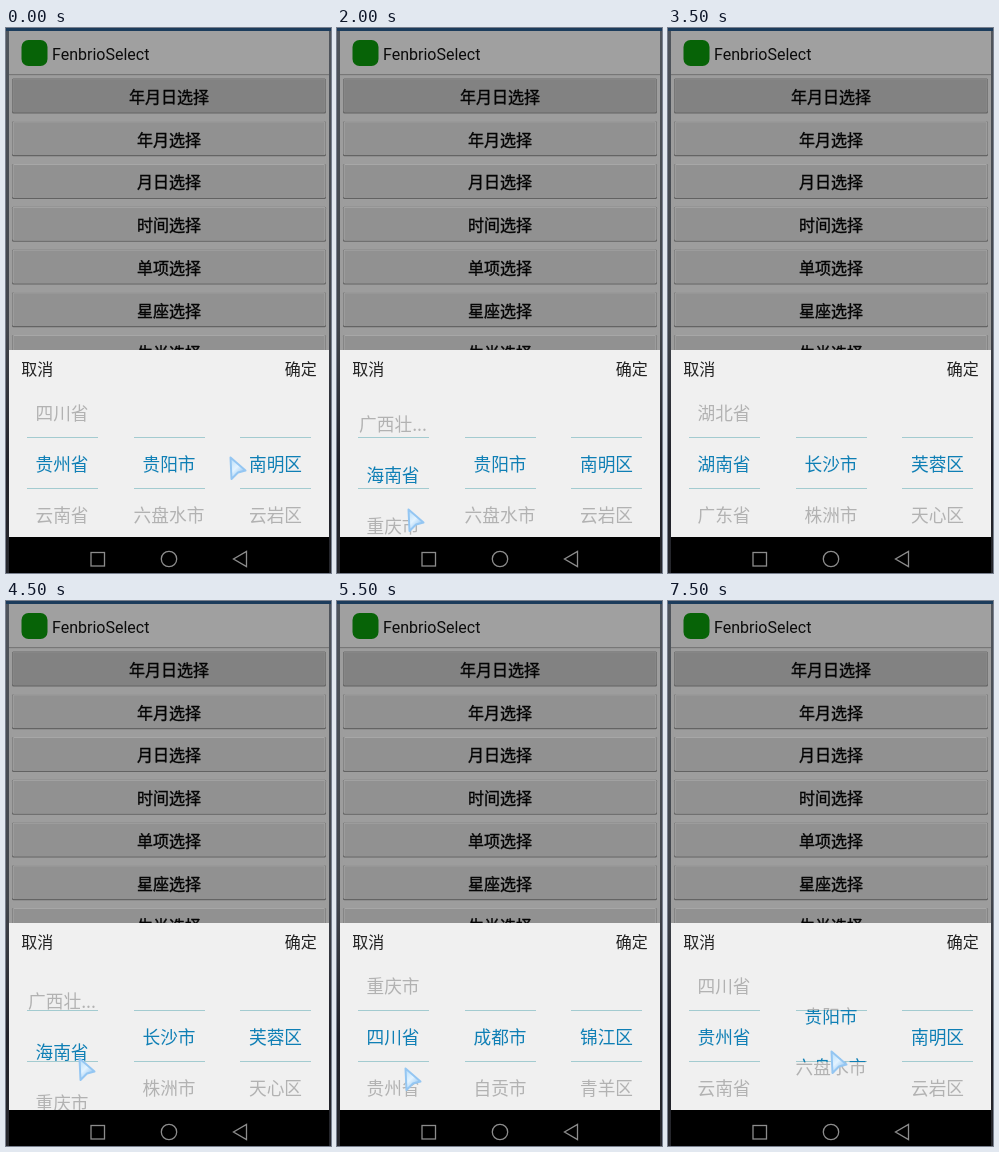
Write an HTML page that moves like this. It is 325x545 px and loops after 8000 ms.

```html
<!DOCTYPE html>
<html lang="zh-CN">
<head>
<meta charset="utf-8">
<title>Region wheel</title>
<style>
html, body { margin: 0; width: 100%; height: 100%; overflow: hidden; background: #25272e; }
svg { display: block; width: 325px; height: 545px; }
text { font-family: "Noto Sans CJK SC", "Noto Sans CJK", sans-serif; font-size: 16px; }
.title { font-family: Roboto, sans-serif; fill: #0c0c0c; }
.button text { text-anchor: middle; fill: #050505; stroke: #050505; stroke-width: .35px; }
.wheel text { font-size: 17.7px; text-anchor: middle; }
.dim { fill: #b2b2b2; }
.lit { fill: #0f7fb5; }
.rules { stroke: #a3cbd0; }
.nav { fill: none; stroke: #8c8c8c; stroke-width: 1.3; }
</style>
</head>
<body>
<svg id="stage" viewBox="0 0 325 545">
  <defs>
    <linearGradient id="edge" x2="0" y2="1">
      <stop offset="0" stop-color="#50555c"/>
      <stop offset=".55" stop-color="#41454c"/>
      <stop offset=".8" stop-color="#20212a"/>
      <stop offset="1" stop-color="#26272c"/>
    </linearGradient>
    <linearGradient id="ice" x2=".7" y2="1">
      <stop offset="0" stop-color="#b4ddfa"/>
      <stop offset=".5" stop-color="#e3f3ff"/>
      <stop offset="1" stop-color="#84bdf0"/>
    </linearGradient>
    <clipPath id="outer"><path d="M3 358H323V409H3ZM3 461H323V509H3Z"/></clipPath>
    <clipPath id="inner"><path d="M3 409H323V461H3Z"/></clipPath>
  </defs>

  <rect width="325" height="545" fill="url(#edge)"/>
  <rect x="3" width="320" height="510" fill="#9d9d9d"/>
  <rect width="325" height="3" fill="#1c3c5c"/>
  <rect x="3" y="3" width="320" height="43" fill="#a0a0a0"/>
  <rect x="3" y="46" width="320" height="1.2" fill="#777"/>
  <rect x="15.5" y="12" width="26" height="26" rx="7" fill="#076307"/>
  <text class="title" x="46" y="31.5">FenbrioSelect</text>
  <g id="buttons"></g>

  <rect x="3" y="322" width="320" height="187" fill="#f0f0f0"/>
  <text x="15.3" y="347" fill="#222">取消</text>
  <text x="278.7" y="347" fill="#222">确定</text>
  <path class="rules" d="M21 409.5h71M128 409.5h71M234 409.5h71M21 460.5h71M128 460.5h71M234 460.5h71"/>
  <g class="wheel dim" clip-path="url(#outer)"></g>
  <g class="wheel lit" clip-path="url(#inner)"></g>

  <rect x="3" y="509" width="320" height="36" fill="#000"/>
  <g class="nav">
    <rect x="85" y="524.5" width="13.5" height="13.5"/>
    <circle cx="163" cy="531" r="7.7"/>
    <path d="M240.5 523.5V538.5L227.5 531Z"/>
  </g>
  <path id="cursor" d="M1.5 1.5L16.5 14.5L9 16.5L2.5 23Z" fill="url(#ice)" stroke="#94c6f2" stroke-width="2" stroke-linejoin="round"/>
</svg>
<script>
const NS = "http://www.w3.org/2000/svg";
const ROW = 51, MID = 436, STEP = 500;

function add(parent, tag, attrs = {}, label = "") {
  const el = document.createElementNS(NS, tag);
  for (const key in attrs) el.setAttribute(key, attrs[key]);
  el.textContent = label;
  return parent.appendChild(el);
}

const buttons = document.getElementById("buttons");
["年月日选择", "年月选择", "月日选择", "时间选择", "单项选择", "星座选择", "生肖选择"].forEach((label, i) => {
  const g = add(buttons, "g", { class: "button", transform: `translate(0 ${50.5 + i * 42.75})` });
  add(g, "rect", { x: 6, y: 0, width: 314, height: 35, rx: 1.5, fill: "#626262" });
  add(g, "rect", { x: 6.5, y: 0, width: 313, height: 33.8, rx: 1.5, fill: i ? "#a7a7a7" : "#8b8b8b" });
  add(g, "rect", { x: 7.5, y: 1, width: 311, height: 32.8, fill: i ? "#919191" : "#828282" });
  add(g, "text", { x: 163, y: 24.3 }, label);
});

// Each column exists twice: dim outside the rules, lit between them.
const layers = document.querySelectorAll(".wheel");
function column(x, names) {
  return [...layers].map(layer => {
    const g = add(layer, "g");
    names.forEach((name, i) => add(g, "text", { x, y: i * ROW + 6.7 }, name));
    return g;
  });
}
function place(groups, y, shown = true) {
  for (const g of groups) {
    g.setAttribute("transform", `translate(0 ${y})`);
    g.style.display = shown ? "" : "none";
  }
}

const HUNAN = 1, HAINAN = 4, SICHUAN = 6, GUIZHOU = 7;
const provinces = column(56, ["湖北省", "湖南省", "广东省", "广西壮...", "海南省", "重庆市", "四川省", "贵州省", "云南省"]);
const regions = [
  [HUNAN, ["长沙市", "株洲市"], ["芙蓉区", "天心区"]],
  [HAINAN, ["海口市", "三亚市"], ["秀英区", "龙华区"]],
  [SICHUAN, ["成都市", "自贡市"], ["锦江区", "青羊区"]],
  [GUIZHOU, ["贵阳市", "六盘水市"], ["南明区", "云岩区"]]
].map(([id, cities, areas]) => ({ id, cities: column(163, cities), areas: column(269.5, areas) }));

// [province row, its shift, region shown, pointer x, pointer y, city shift]
const poses = [
  [GUIZHOU, 0, GUIZHOU, 223, 428],
  [GUIZHOU, 0, GUIZHOU, 67, 453],
  [GUIZHOU, 0, GUIZHOU, 60, 406],
  [HAINAN, -23, GUIZHOU, 65, 470],
  [HAINAN, 11, GUIZHOU, 70, 480],
  [HAINAN, 0, HAINAN],
  [HUNAN, 11, HAINAN, 71, 510],
  [HUNAN, 0, HUNAN],
  [HAINAN, 58, HUNAN, 84, 338],
  [HAINAN, 15, HUNAN, 72, 456],
  [HAINAN, -20, HAINAN, 72, 436],
  [SICHUAN, 0, SICHUAN, 67, 466],
  [SICHUAN, -26, SICHUAN, 70, 440],
  [GUIZHOU, -9, SICHUAN, 131, 458],
  [GUIZHOU, 0, GUIZHOU, 152, 471],
  [GUIZHOU, 0, GUIZHOU, 162, 449, -21]
];

const cursor = document.getElementById("cursor");
function draw(ms) {
  const [row, shift, region, x, y, cityShift = 0] = poses[Math.floor(ms / STEP) % poses.length];
  place(provinces, MID + shift - row * ROW);
  for (const r of regions) {
    place(r.cities, MID + cityShift, r.id === region);
    place(r.areas, MID, r.id === region);
  }
  cursor.style.display = x === undefined ? "none" : "";
  if (x !== undefined) cursor.setAttribute("transform", `translate(${x} ${y})`);
}

const start = performance.now();
function tick() {
  draw(performance.now() - start);
  requestAnimationFrame(tick);
}
tick();
</script>
</body>
</html>
```
